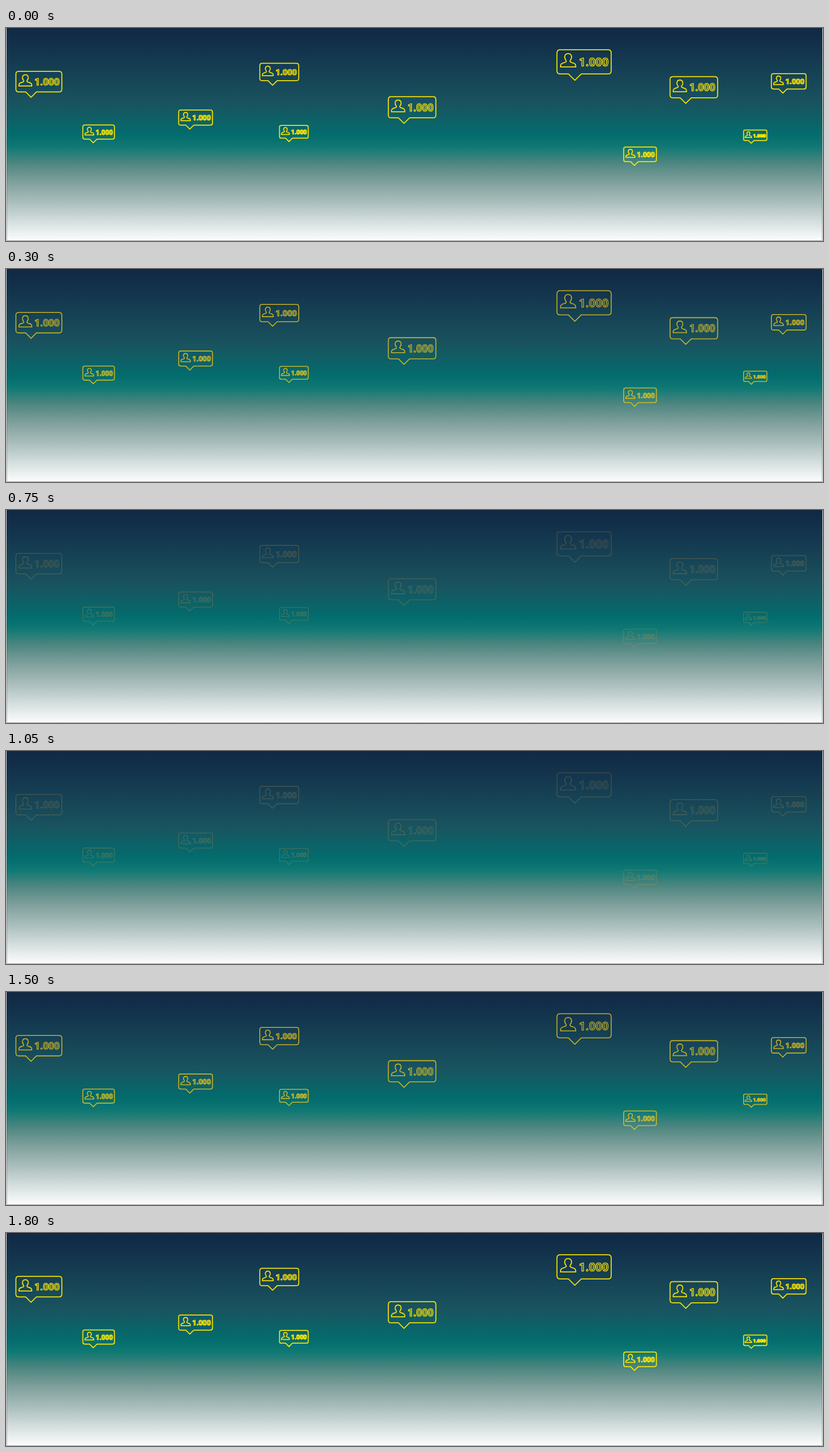
Write an HTML page that moves like this. It is 1280 by 335 pixels and loops after 1950 ms.

```html
<!DOCTYPE html>
<html lang="en">
<head>
<meta charset="utf-8">
<title>Follower bubbles</title>
<style>
  html, body { margin: 0; width: 100%; height: 100%; overflow: hidden; background: #fff; }
  svg { display: block; width: 1280px; height: 335px; }
  text { font: bold 17.9px Roboto, Arial, sans-serif; }
</style>
</head>
<body>
<svg viewBox="0 0 1280 335">
  <defs>
    <linearGradient id="sky" gradientUnits="userSpaceOnUse" x1="0" y1="0" x2="0" y2="335">
      <stop offset="0" stop-color="#112945"/>
      <stop offset=".06" stop-color="#122e49"/>
      <stop offset=".35" stop-color="#19535f"/>
      <stop offset=".5" stop-color="#036c6d"/>
      <stop offset=".56" stop-color="#107974"/>
      <stop offset=".63" stop-color="#4b857f"/>
      <stop offset=".72" stop-color="#7e9f9b"/>
      <stop offset=".82" stop-color="#abbfbd"/>
      <stop offset=".91" stop-color="#d5dfde"/>
      <stop offset="1" stop-color="#fdfdfe"/>
    </linearGradient>
  </defs>
  <rect x="1" width="1278" height="335" fill="url(#sky)"/>
  <rect x="1" y=".4" width="1278" height="334.1" fill="none" stroke="#222" stroke-opacity=".6" stroke-width=".7"/>
  <g id="bubbles" fill="none" stroke-linejoin="round"></g>
</svg>
<script>
const STEP = 150, STEPS = 13, HALF = 6;
const UNIT = 85; // width of the bubble outline below

const OUTLINE = 'M5 0H80Q85 0 85 5V33Q85 38 80 38H38L28 48L18 38H5Q0 38 0 33V5Q0 0 5 0Z';
const PERSON = 'M5.5 27C5.5 22 7 21.5 12 20C15 19 15 18 14 16.5C10.5 12 12 6 17.5 6' +
  'C23 6 24.5 12 21 16.5C20 18 20 19 23 20C28 21.5 29.5 22 29.5 27Z';

// x, y, width
const places = [
  [15.5, 68.3, 72], [120.4, 152.6, 49.5], [270.5, 129, 53], [397.6, 55.6, 61],
  [428.5, 153.2, 45], [599, 108, 74.5], [863.2, 34.2, 85], [1040.4, 76.5, 74.5],
  [1199.2, 71.7, 54.3], [967.7, 187.2, 51.3], [1155.6, 160.6, 36.5]
];

const root = document.getElementById('bubbles');
const bubbles = places.map(([x, y, w]) => {
  const scale = w / UNIT;
  const g = document.createElementNS('http://www.w3.org/2000/svg', 'g');
  g.setAttribute('transform', `translate(${x} ${y}) scale(${scale})`);
  g.innerHTML = `<path d="${OUTLINE}${PERSON}"/><text x="34.6" y="25.8">1.000</text>`;
  root.append(g);
  return { line: g.firstChild, label: g.lastChild, scale };
});

const mix = (a, b, t) => a + (b - a) * t;
const bright = [255, 230, 0], dull = [190, 130, 85];

function draw(now) {
  const step = Math.floor(now / STEP) % STEPS;
  const fade = 1 - Math.abs(step - HALF) / HALF;
  const width = mix(1.5, 1, fade);
  root.setAttribute('stroke', `rgb(${bright.map((c, i) => Math.round(mix(c, dull[i], fade)))})`);
  root.setAttribute('stroke-opacity', 1 - fade * fade);
  for (const { line, label, scale } of bubbles) {
    line.setAttribute('stroke-width', width / scale);
    label.setAttribute('stroke-width', width * 0.8 / scale);
  }
}

const start = performance.now();
function tick() {
  draw(performance.now() - start);
  requestAnimationFrame(tick);
}
draw(0);
requestAnimationFrame(tick);
</script>
</body>
</html>
```
